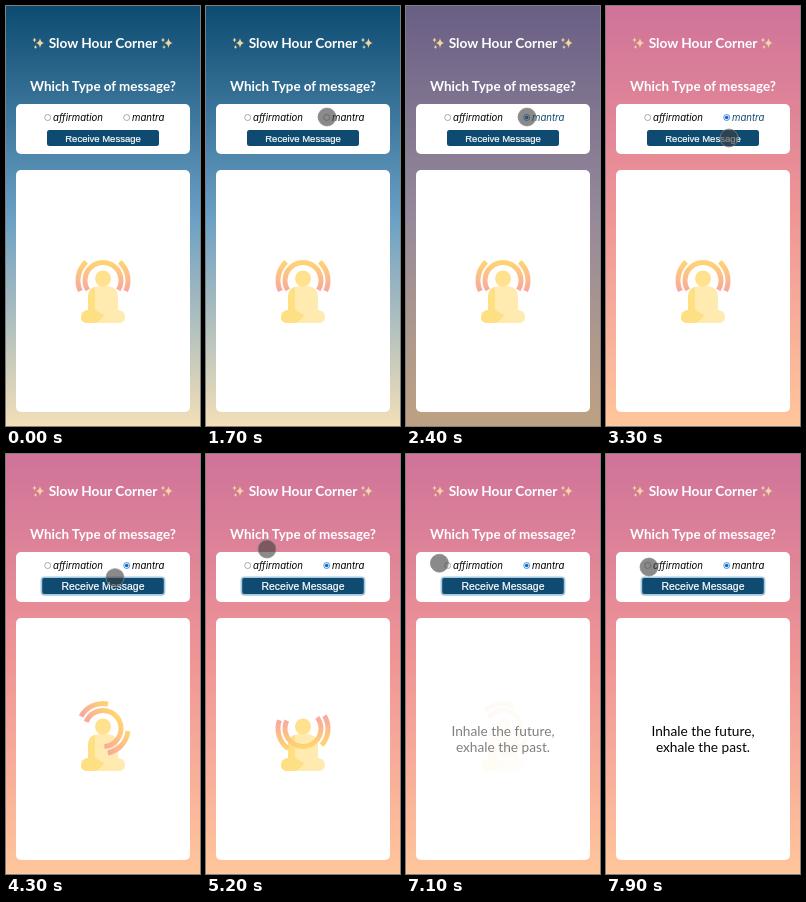
These frames come from a looping animation (194x420 px, 8000 ms). An HTML page:

```html
<!DOCTYPE html>
<html lang="en">
<head>
<meta charset="utf-8">
<title>Slow Hour Corner</title>
<style>
  html, body { margin: 0; width: 100%; height: 100%; overflow: hidden; }
  svg { display: block; width: 100%; height: 100%; }
  text { font-family: Lato, sans-serif; }
  .head { font-weight: 700; fill: #fff; text-anchor: middle; }
  .label { font: italic 9.6px Inter, sans-serif; }
  #button text { font: 9.5px "Liberation Sans", sans-serif; fill: #fff; stroke: #fff; stroke-width: .2; text-anchor: middle; }
  #message { font-size: 13.7px; text-anchor: middle; }
</style>
</head>
<body>
<svg viewBox="0 0 194 420">
  <defs>
    <linearGradient id="sea" x2="0" y2="1">
      <stop stop-color="#0d4b70"/><stop offset=".5" stop-color="#6a9fc5"/><stop offset="1" stop-color="#f3dfb8"/>
    </linearGradient>
    <linearGradient id="sunset" x2="0" y2="1">
      <stop stop-color="#cf739a"/><stop offset=".5" stop-color="#f09696"/><stop offset="1" stop-color="#ffc69c"/>
    </linearGradient>
    <linearGradient id="shade" x2="0" y2="1">
      <stop stop-opacity="0"/><stop offset="1" stop-opacity=".24"/>
    </linearGradient>
    <linearGradient id="glow" gradientUnits="userSpaceOnUse" x1="0" y1="-20" x2="0" y2="12">
      <stop stop-color="#ffd670"/><stop offset="1" stop-color="#f8a5a2"/>
    </linearGradient>
    <path id="star" d="M0-6Q.7-.7 5 0Q.7.7 0 6Q-.7.7-5 0Q-.7-.7 0-6Z"/>
    <g id="sparkles" fill="#f3d6a0">
      <use href="#star" transform="translate(1.5 0) scale(.85)"/>
      <use href="#star" transform="translate(-4 -3) scale(.4)"/>
      <use href="#star" transform="translate(-3 4) scale(.35)"/>
    </g>
  </defs>

  <rect width="194" height="420" fill="url(#sea)"/>
  <rect id="dusk" width="194" height="420" fill="url(#sunset)"/>
  <rect id="dim" width="194" height="420" fill="url(#shade)"/>
  <use href="#sparkles" x="32.5" y="37"/>
  <use href="#sparkles" x="161" y="37"/>
  <text class="head" x="97" y="42" font-size="13.7">Slow Hour Corner</text>
  <text class="head" x="97" y="85" font-size="13.4">Which Type of message?</text>

  <g fill="#fff">
    <rect x="10" y="98" width="174" height="50" rx="5"/>
    <rect x="10" y="164" width="174" height="242" rx="5"/>
  </g>
  <g fill="#fff" stroke="#8a8a8a" stroke-width=".7">
    <circle cx="41.7" cy="111.5" r="3"/>
    <circle id="ring" cx="120.7" cy="111.5" r="3"/>
  </g>
  <circle id="dot" cx="120.7" cy="111.5" r="1.8" fill="#0b69d0"/>
  <text class="label" x="47" y="115">affirmation</text>
  <text class="label" id="mantra" x="126" y="115">mantra</text>
  <g id="button">
    <rect x="-56" y="-8" width="112" height="16" rx="2.5" fill="#0f4b70"/>
    <text y="3.6">Receive Message</text>
  </g>

  <g id="icon">
    <path d="M82 304V290Q83 280 93 280H101Q111 280 112 290V304Q119 305 119 311T112 317H82Q75 317 75 311T82 304Z" fill="#ffebaf"/>
    <path d="M82 304V290Q83 282 89 281V304L98 309Q94 317 86 317H82Q75 317 75 311T82 304Z" fill="#ffdf84"/>
    <circle cx="97" cy="272.5" r="8" fill="#ffe18e"/>
    <g id="arcs" fill="none" stroke="url(#glow)" stroke-width="5"></g>
  </g>
  <g id="message">
    <text x="97" y="282">Inhale the future,</text>
    <text x="97" y="298">exhale the past.</text>
  </g>
  <circle id="pointer" r="9" fill="#3c3c3c" fill-opacity=".6" stroke="#888" stroke-opacity=".7"/>
</svg>
<script>
const LOOP = 8000, STEP = 100;
const CHOOSE = 2100, SEND = 3900;
const SPIN = 0.134; // degrees per ms
const $ = id => document.getElementById(id);
const set = (el, attrs) => Object.entries(attrs).forEach(([k, v]) => el.setAttribute(k, v));
const ramp = (t, from, to) => Math.min(1, Math.max(0, (t - from) / (to - from)));
const smooth = p => p * p * (3 - 2 * p);

function arc(radius, from, to) {
  const point = deg => [Math.cos(deg * Math.PI / 180) * radius, Math.sin(deg * Math.PI / 180) * radius];
  return `<path d="M${point(from)}A${radius} ${radius} 0 ${+(to - from > 180)} 1 ${point(to)}"/>`;
}
$('arcs').innerHTML = arc(25, -48, 25) + arc(25, 155, 228) + arc(18, 148, 392);

// The pointer glides to each stop in turn and rests there.
const moves = [
  { from: 600, to: 1700, x: 121, y: 111 },
  { from: 2500, to: 3300, x: 123, y: 132 },
  { from: 3900, to: 5200, x: 61, y: 95 },
  { from: 5200, to: 6000, x: 33, y: 109 },
  { from: 7000, to: 7800, x: 43, y: 113 }
];
function pointerAt(t) {
  let x = 157, y = 99;
  for (const move of moves) {
    const p = smooth(ramp(t, move.from, move.to));
    x += (move.x - x) * p;
    y += (move.y - y) * p;
  }
  return { cx: x, cy: y };
}

function draw(t) {
  const chosen = t >= CHOOSE, sent = t >= SEND;
  const change = ramp(t, 2000, 2850);
  set($('dusk'), { opacity: change });
  set($('dim'), { opacity: Math.sin(change * Math.PI) });

  set($('ring'), { stroke: chosen ? '#0b69d0' : '#8a8a8a' });
  set($('dot'), { opacity: +chosen });
  set($('mantra'), { fill: chosen && !sent ? '#0f4b70' : '#000' });
  set($('button'), { transform: `translate(97 132) scale(${sent ? 1.1 : 1})` });
  set($('button').firstElementChild, { stroke: sent ? '#a5c8de' : 'none', 'stroke-width': 1.5 });

  set($('arcs'), { transform: `translate(97 274.5) rotate(${Math.max(0, t - SEND) * SPIN})` });
  set($('icon'), { opacity: 1 - ramp(t, 5600, 7200) });
  set($('message'), { opacity: ramp(t, 6500, 7700) });
  set($('pointer'), { ...pointerAt(t), opacity: +(t >= 600) });
}

const start = performance.now();
function tick() {
  const t = (performance.now() - start) % LOOP;
  draw(Math.floor(t / STEP) * STEP);
  requestAnimationFrame(tick);
}
tick();
</script>
</body>
</html>
```
